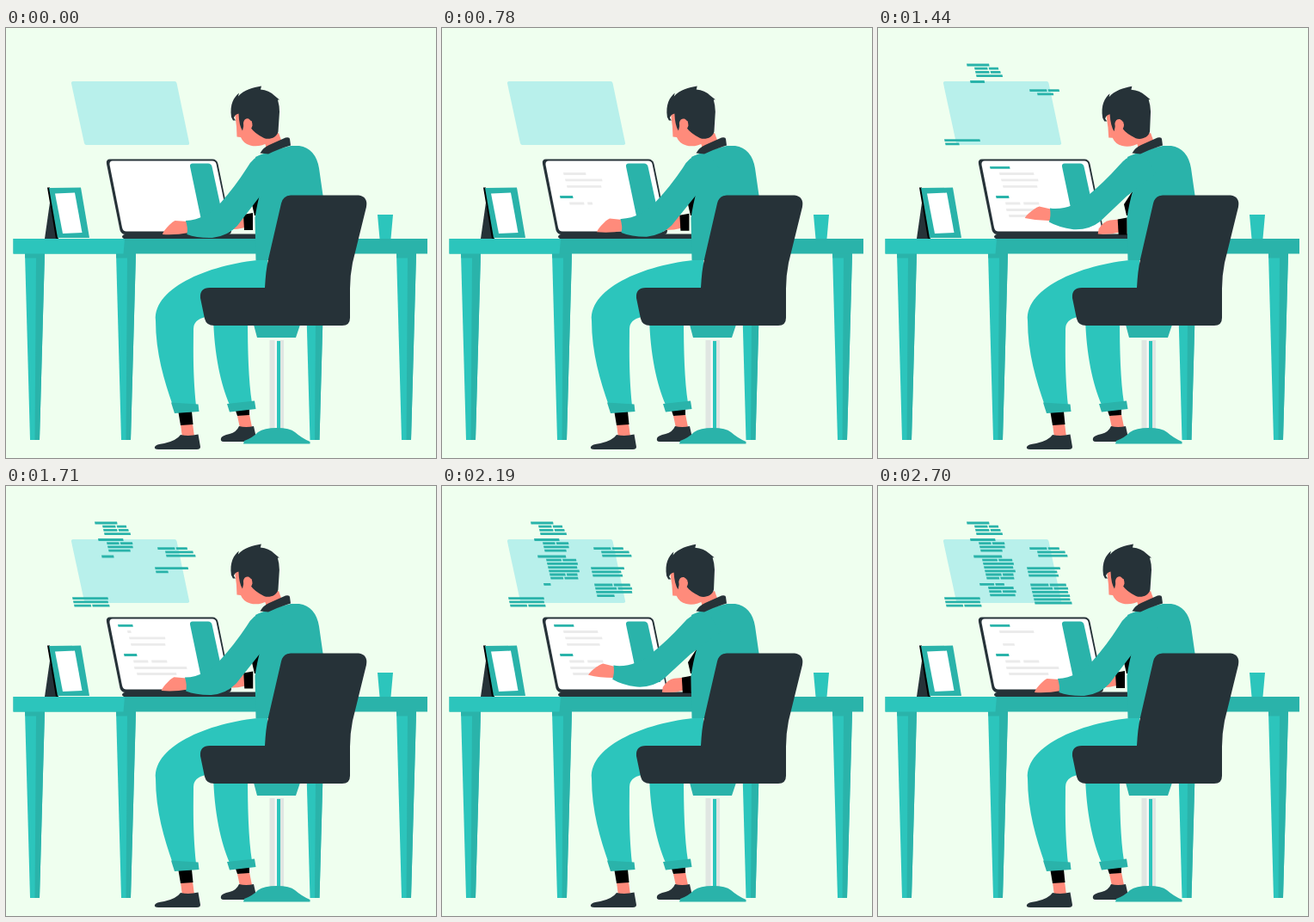
These frames come from a looping animation (500x500 px, 2730 ms). An HTML page:

```html
<!DOCTYPE html>
<html lang="en">
<head>
<meta charset="utf-8">
<title>Working at a desk</title>
<style>
html, body { margin: 0; width: 100%; height: 100%; overflow: hidden; background: #efffef; }
svg { display: block; width: 100vw; height: 100vh; }
.dark { fill: #263238; }
.deep { fill: #2ab3aa; }
.teal { fill: #2cc5bc; }
.skin { fill: #ff8b7b; }
.white { fill: #fff; }
.pale { fill: #ebebeb; }
</style>
</head>
<body>
<svg viewBox="0 0 500 500">
  <defs>
    <g id="leg">
      <path class="teal" d="M0 262H23L17 479H6Z"/>
      <path class="deep" d="M0 262H23L17 479H11.5L13 267.500H.2Z"/>
    </g>
  </defs>

  <path d="M78 62H196Q198 62 198.500 64L213 133.500Q213.500 136 211 136H93.500Q91.500 136 91 134L76 64.500Q75.600 62 78 62Z" fill="#b8f0eb"/>
  <g id="cloud"></g>

  <!-- desk -->
  <use href="#leg" x="22"/>
  <use href="#leg" x="128"/>
  <use href="#leg" x="347.500"/>
  <use href="#leg" x="454"/>
  <path class="deep" d="M8.500 245H490V262.500H8.500Z"/>
  <path class="teal" d="M8.500 245H138L136.500 262.500H8.500Z"/>
  <path class="teal" d="M432 217H450L447.500 245H434.500Z"/>

  <!-- photo frame -->
  <path class="dark" d="M51 203L60 245H45Z"/>
  <path d="M48 185.500H51L61 245H58Z"/>
  <path class="deep" d="M50 186L87 185.500L97 244H60Z"/>
  <path class="white" d="M57 192.500L80 191.500L88.500 238L66 239Z"/>

  <!-- laptop -->
  <path class="dark" d="M121 152.500H240Q245 152.500 246.500 158L262 234Q262.500 240 258 240H139Q134 240 132.500 235L117 158Q116 152.500 121 152.500Z"/>
  <path class="white" d="M124 154.500H240Q243.500 154.500 244.500 158L260 232Q260.500 236.500 257 236.500H140Q136 236.500 135 232L120.500 159Q120 154.500 124 154.500Z"/>
  <path class="deep" d="M217 157.500H235Q238.500 157.500 239.500 161L254 228H228L214 161Q213.500 157.500 217 157.500Z"/>
  <g id="screen"></g>
  <path class="dark" d="M139 239.500H291V245H137Q132 242 139 239.500Z"/>

  <!-- far hand -->
  <g id="farHand">
    <path class="skin" d="M256 240L257 234Q263 225 270 224L281 223V238Q270 241 256 240Z"/>
    <path d="M279 223L290 221V241H280Z"/>
  </g>

  <!-- far leg -->
  <path class="skin" d="M269 451L283 449L286 464L272 465Z"/>
  <path d="M267 445L283 443V450L269 451Z"/>
  <path class="dark" d="M250 477Q251 474 260 472Q268 470 271 463Q279 465 288 463L292 481H253Q249 481 250 477Z"/>
  <path class="teal" d="M241 336C242 380 250 415 260 438L286 436C282 410 281 375 281 336Z"/>
  <path class="deep" d="M257 437L289 433.500L290.500 443L260 446.500Z"/>

  <!-- near leg -->
  <path class="skin" d="M203 461L217 460L219 475L205 476Z"/>
  <path d="M200.500 447L216 446L217.500 461L203 462Z"/>
  <path class="dark" d="M173 487Q174 484 184 483Q198 480 203 473Q213 475 223.500 472.500L226 487Q226 490 222 490H177Q172 490 173 487Z"/>
  <path class="teal" d="M304 269C240 273 171 301 174 340C174 378 184 410 194 439H221C217 400 218 370 218 350Q218 339 232 336L304 325Z"/>
  <path class="deep" d="M192 435.500L223.500 437.500L224.500 446L196 448Z"/>

  <!-- head -->
  <path class="skin" d="M299 128L317 122L321 133L303 140Z"/>
  <g id="head">
    <path class="skin" d="M266 98L268 114L268.500 126L273 126.500Q276 134 284 136Q294 139 306 132L303 108L282 94Z"/>
    <path class="dark" d="M262 103C260 88 265 80 271 75L270 79C277 71 287 69 297 67L296 71Q306 72 312 78L318 83L316 83Q318 90 318 97L316.500 120C315 127 306 130 300 127.500Q289 122 285 116L286 108L278 106L275 119Q271 113 270.500 99Q266 100 265 104L267 107H264Z"/>
    <path class="skin" d="M276 110Q277 104.500 282 105Q287 108 286.500 113Q285 119 280 118Q276 116 276 110Z"/>
  </g>

  <!-- torso -->
  <path d="M297 188L286 205L289 218H300Z"/>
  <path class="deep" d="M290 150Q300 145 331 137H341Q360 140 364 163L370 205L340 270H290.500L289.500 221Q292 204 296 190Z"/>
  <path class="dark" d="M295.500 145.500Q299 139 306 136L325 127.500Q330 126.500 330 129L331 136.500Q316 141 305 146.500Z"/>

  <!-- near arm -->
  <g id="arm">
    <path class="skin" d="M182 240Q183 236 190 229Q194 225 196.500 224L211 225L213 238Q197 241 182 240Z"/>
    <path class="deep" d="M298 147Q287 150 280 163Q266 185 249 204C240 214 225 224 209 224Q212 233 210.500 240Q222 244.500 240 244Q258 242 269 230L295 196L325 165L310 148Z"/>
  </g>

  <!-- chair -->
  <path class="deep" d="M288 345H342L337 360H292Z"/>
  <path d="M306.500 363H323V467H306.500Z" fill="#e0e6e2"/>
  <path d="M312.500 363H315V467H312.500Z" fill="#f5f7f5"/>
  <path class="teal" d="M315 364H319V467H315Z"/>
  <path class="deep" d="M276 483.500L277 480Q286 477 293 470Q300 465 315 465Q330 465 336 470Q344 477 353.500 481V483.500Z"/>
  <path class="dark" d="M331 194.500H410Q421 196 419 208L403 273Q400 288 400 303V337Q400 346 391 346H242Q233 346 231 338L226 314Q225 302 237 302H301Q302 282 305 269L320 204Q322 195 331 194.500Z"/>
</svg>
<script>
const LOOP = 2730, STEP = 30, SWING = LOOP / 3, RETYPE = 780, LEAD = 20;
const BAR = 2.8, PITCH = 4.2;
const $ = id => document.getElementById(id);
const clamp = v => Math.max(0, Math.min(1, v));

let seed = 7;
function random() {
  seed = seed * 16807 % 2147483647;
  return seed / 2147483647;
}

const bars = [];

// width(t) gives the length of the bar at a time
function addBar(parent, cls, x, y, width) {
  const el = document.createElementNS("http://www.w3.org/2000/svg", "path");
  el.setAttribute("class", cls);
  $(parent).append(el);
  bars.push({ el, x, y, width });
}

// Types one row of code, sometimes broken into two words
function addRow(x, y, w, start, duration) {
  const cut = random() < 0.35 ? w * (0.4 + 0.2 * random()) : w;
  const typed = t => clamp((t - start) / duration) * w;
  addBar("cloud", "deep", x, y, t => Math.min(typed(t), cut));
  if (cut < w) addBar("cloud", "deep", x + cut + 1.5, y, t => typed(t) - cut - 1.5);
}

// Paragraphs in a column are typed one after another; later rows are indented
function addColumn(start, duration, paragraphs) {
  for (const { x, y, rows, w, indent = 0 } of paragraphs) {
    for (let i = 0; i < rows; i++, start += duration) {
      const shift = i ? indent + i : 0;
      addRow(x + shift, y + i * PITCH, w + 6 * (random() - 0.5), start, duration);
    }
  }
}

addColumn(1120, 70, [
  { x: 103, y: 43, rows: 4, w: 29, indent: 8 },
  { x: 107, y: 62.500, rows: 4, w: 28, indent: 9 },
  { x: 111, y: 82, rows: 7, w: 33, indent: 9 },
  { x: 118, y: 114.300, rows: 4, w: 29, indent: 9 }
]);
addColumn(1290, 95, [
  { x: 176, y: 72.700, rows: 3, w: 35, indent: 8 },
  { x: 173, y: 95.700, rows: 3, w: 36 },
  { x: 177, y: 115, rows: 6, w: 42 }
]);
addColumn(1300, 100, [{ x: 77, y: 130.700, rows: 3, w: 42 }]);

// Screen: a heading and three lines that are rewritten over and over
addBar("screen", "deep", 130, 162.300, t => 23 * clamp(t % RETYPE / 200));
[130, 360, 425].forEach((zero, i) => {
  const wave = t => Math.abs(Math.sin(Math.PI * (t - zero) / RETYPE));
  addBar("screen", "pale", 141 + 2 * i, 169.500 + 7.400 * i,
    t => t < zero ? 0 : (40 + i % 2 * 3) * clamp(1.3 * wave(t)));
});

// Screen: lines that stay once typed
[[137, 196.500, 15], [148, 204, 17], [169, 204, 18], [149, 211.500, 61], [152, 218.500, 46]]
  .forEach(([x, y, w], i) =>
    addBar("screen", i ? "pale" : "deep", x, y, t => w * clamp((t - 560) / 95 - i)));

function render(t) {
  const lift = (1 - Math.cos(2 * Math.PI * (t + LEAD) / SWING)) / 2;
  $("arm").setAttribute("transform", `rotate(${10.2 * lift} 295 160)`);
  $("head").setAttribute("transform", `translate(0 .4) rotate(${-1.5 * lift} 310 138)`);
  $("farHand").setAttribute("transform", `translate(${3 * lift - 3} ${6 * lift - 6})`);

  for (const { el, x, y, width } of bars) {
    const w = width(t);
    el.setAttribute("d", w > 0.3 ? `M${x} ${y - BAR / 2}h${w}l.6 ${BAR}h${-w}z` : "");
  }
}

const begin = performance.now();
function tick() {
  const t = (performance.now() - begin) % LOOP;
  render(Math.floor(t / STEP) * STEP);
  requestAnimationFrame(tick);
}
tick();
</script>
</body>
</html>
```
